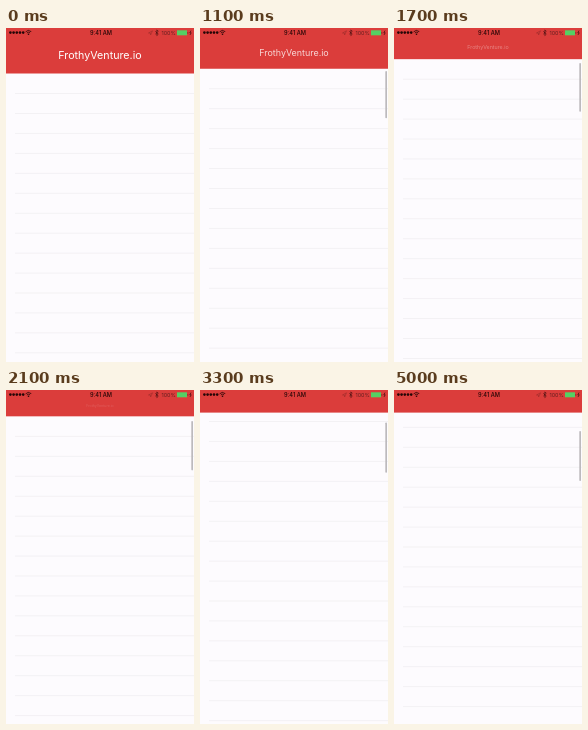
An HTML page with a canvas that plays this animation: 188x334 px, repeating every 5.1 s.

```html
<!DOCTYPE html>
<html lang="en">
<head>
<meta charset="utf-8">
<title>Collapsing header</title>
<style>
html, body { margin: 0; width: 100%; height: 100%; overflow: hidden; background: #fdfbfe; }
canvas { display: block; width: 188px; height: 334px; }
</style>
</head>
<body>
<canvas id="stage" width="188" height="334"></canvas>
<script>
const W = 188, H = 334, LOOP = 5100, STEP = 100;
const TALL = 45.5, SHORT = 22.6, ROW = 19.95, FIRST_ROW = 65;
const RED = '#db3d3b', INK = '#240606', MUTED = '#642020';
const ctx = document.getElementById('stage').getContext('2d');

const progress = (t, from, to) => Math.min(1, Math.max(0, (t - from) / (to - from)));

// The finger pulls the list up in four paces, then lets it slip back.
function offsetAt(t) {
  return 9.5 * progress(t, 900, 1300)
    + 14.5 * progress(t, 1300, 2500)
    + 30 * progress(t, 2500, 3300)
    + 75 * progress(t, 3300, 4500)
    - 21 * progress(t, 4700, 5000);
}

function rect(x, y, w, h, color) {
  ctx.fillStyle = color;
  ctx.fillRect(x, y, w, h);
}

function dot(x, y, r, color) {
  ctx.fillStyle = color;
  ctx.beginPath();
  ctx.arc(x, y, r, 0, 2 * Math.PI);
  ctx.fill();
}

function path(points, color, width) {
  ctx.beginPath();
  points.forEach(([x, y]) => ctx.lineTo(x, y));
  ctx.strokeStyle = color;
  ctx.lineWidth = width;
  ctx.stroke();
}

function label(text, x, y, size, color, weight = 400) {
  ctx.font = `${weight} ${size}px Inter, "Liberation Sans", sans-serif`;
  ctx.textAlign = 'center';
  ctx.textBaseline = 'alphabetic';
  ctx.fillStyle = color;
  ctx.fillText(text, x, y);
}

function drawRows(offset, top) {
  for (let y = FIRST_ROW - offset; y < H; y += ROW) {
    if (y > top + 1) rect(9, y, W - 9, 1, '#f3f1f4');
  }
}

function drawBar(offset, top) {
  const y = top + 1.6 + offset * 0.155;
  const length = (330 - top) * 0.163;
  ctx.fillStyle = '#bcbabd';
  ctx.beginPath();
  ctx.roundRect(185.3, y, 1.7, length, 0.8);
  ctx.fill();
}

function drawTitle(offset) {
  const alpha = 1 - offset / (TALL - SHORT);
  if (alpha <= 0) return;
  const scale = 1 - 0.035 * offset;
  ctx.save();
  ctx.globalAlpha = alpha;
  ctx.translate(94, 27 - 0.58 * offset);
  ctx.scale(scale, scale);
  label('FrothyVenture.io', 0, 4, 10.7, '#fff');
  ctx.restore();
}

function drawStatus() {
  for (let i = 0; i < 5; i++) dot(4.4 + i * 3.2, 4.6, 1.3, INK);

  ctx.strokeStyle = INK;
  ctx.lineWidth = 0.8;
  for (const r of [2.2, 3.9]) {
    ctx.beginPath();
    ctx.arc(22.5, 6.5, r, -Math.PI * 0.77, -Math.PI * 0.23);
    ctx.stroke();
  }
  dot(22.5, 6.2, 0.8, INK);

  label('9:41 AM', 95, 7, 5.7, INK, 500);

  path([[142.5, 5], [146.5, 2.8], [144.6, 7], [144.4, 5.1], [142.5, 5]], '#9c2c2a', 0.6);
  path([[149.3, 3.2], [152.3, 6.2], [150.8, 7.6], [150.8, 1.9], [152.3, 3.3], [149.3, 6.2]], INK, 0.5);
  label('100%', 162.6, 7, 5.4, MUTED);

  rect(171, 2.3, 10, 5, '#55cf63');
  rect(181.6, 4, 0.6, 1.8, MUTED);
  path([[185, 2.6], [183.8, 4.8], [185.2, 4.8], [184, 7]], INK, 0.6);
}

function draw(time) {
  const t = Math.floor((time % LOOP) / STEP) * STEP;
  const offset = offsetAt(t);
  const top = Math.max(SHORT, TALL - offset);
  rect(0, 0, W, H, '#fdfbfe');
  drawRows(offset, top);
  if (offset > 0) drawBar(offset, top);
  rect(0, 0, W, top, RED);
  drawTitle(offset);
  drawStatus();
}

const start = performance.now();
function tick() {
  draw(performance.now() - start);
  requestAnimationFrame(tick);
}
tick();
</script>
</body>
</html>
```
